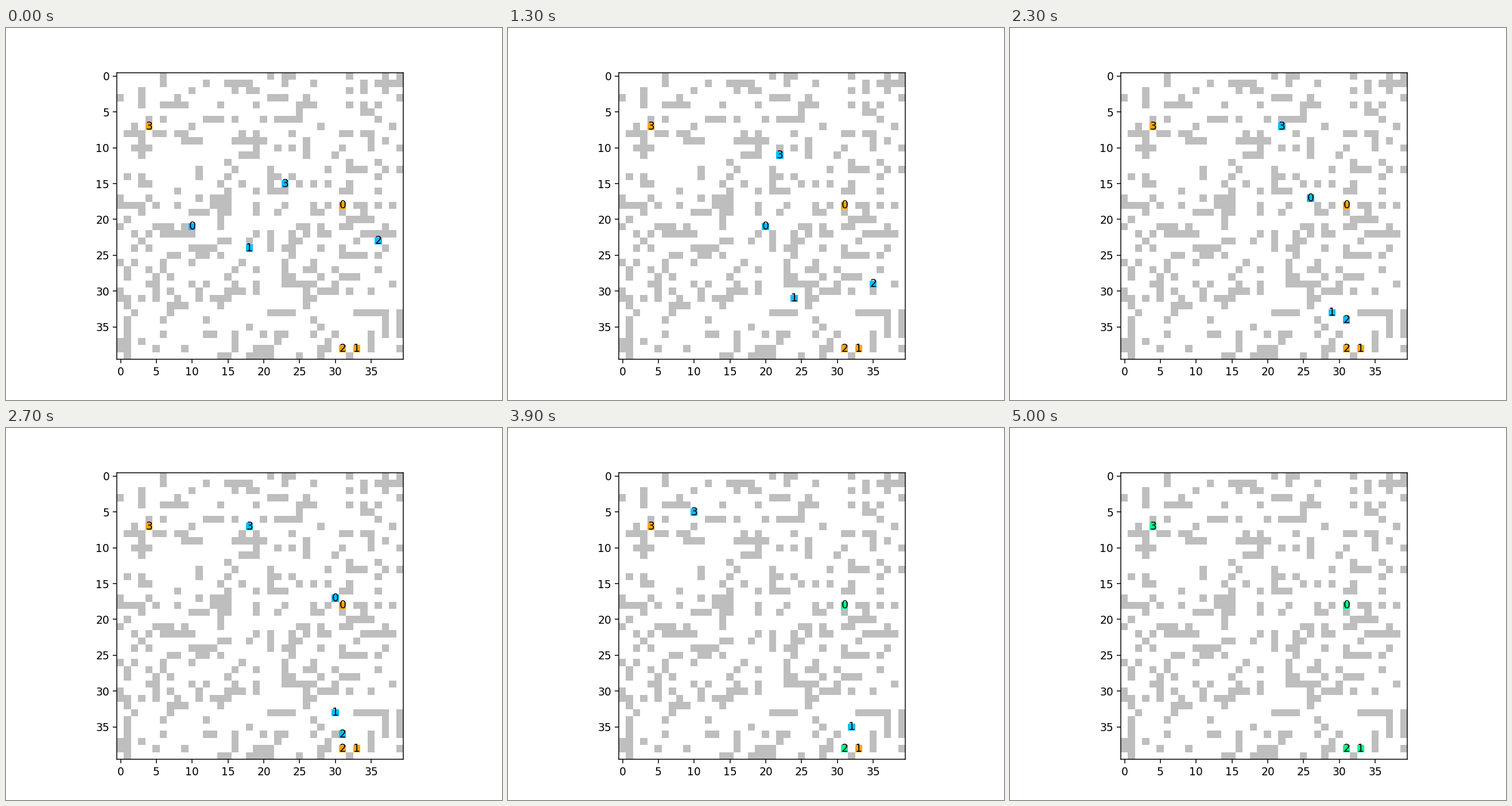
Recreate the animation shown at these times as a matplotlib script. Size 864 by 648 pixels, loop 8000 ms.

```python
import matplotlib.pyplot as plt
import numpy as np
from matplotlib.animation import FuncAnimation

SIZE = 40
STEP_MS = 100
FRAMES = 80

WHITE = (255, 255, 255)
WALL = (190, 190, 190)
GOAL = (255, 165, 0)
AGENT = (0, 191, 255)
ARRIVED = (0, 255, 144)

MOVES = {"U": (-1, 0), "D": (1, 0), "L": (0, -1), "R": (0, 1), ".": (0, 0)}

# Start cell (row, column) and one move per step; a dot waits.
AGENTS = [
    ((21, 10), ".RRDR" "RRUR" "RRRR" "URRRRU" "RUURRRRR" "RD"),
    ((24, 18), "DDRRR" "DDDD" "DRRR" "RDDRRR" "...R...R"
               "..R..D..D" "..R" "DDDR" "....." "RL"),
    ((23, 36), "RRRDD" "DLLD" "DDLL" "LLDDDL" "DL.D.D.D" "DD"),
    ((15, 23), "UULUU" + "." * 12 + "RU" "UUULLLLL"
               "UULLLLLLU" "LLD" "LLLLLL" "LDDR"),
]

# The longest walls: (row, column, length) across, then downwards.
ACROSS = [
    (1, 16, 3), (1, 36, 3), (3, 21, 3), (4, 6, 4), (6, 12, 3), (8, 1, 3),
    (9, 16, 4), (11, 17, 3), (18, 0, 3), (19, 10, 3), (20, 32, 3),
    (21, 5, 3), (22, 8, 3), (22, 36, 3), (24, 11, 3), (25, 31, 3),
    (28, 31, 3), (29, 23, 5), (30, 15, 3), (30, 28, 3), (31, 13, 3),
    (32, 7, 3), (33, 21, 4), (33, 33, 5), (38, 19, 3), (39, 18, 4),
]
DOWN = [
    (2, 3, 3), (8, 3, 4), (9, 19, 3), (9, 26, 3), (13, 21, 4), (16, 15, 4),
    (19, 14, 3), (22, 21, 3), (22, 24, 4), (26, 23, 4), (28, 5, 4),
    (29, 26, 4), (34, 1, 6), (34, 37, 3), (34, 39, 3), (36, 16, 3),
    (36, 35, 3),
]


def walk(start, moves):
    cells = [start]
    for move in moves:
        (row, col), (dr, dc) = cells[-1], MOVES[move]
        cells.append((row + dr, col + dc))
    return cells


def build_map(paths):
    """Scattered blocks plus the long walls, with every route kept free."""
    rng = np.random.default_rng(7)
    walls = rng.random((SIZE, SIZE)) < 0.18
    for path in paths:
        for cell in path:
            walls[cell] = False
    for row, col, length in ACROSS:
        walls[row, col:col + length] = True
    for row, col, length in DOWN:
        walls[row:row + length, col] = True
    grid = np.full((SIZE, SIZE, 3), WHITE, dtype=np.uint8)
    grid[walls] = WALL
    return grid


paths = [walk(start, moves) for start, moves in AGENTS]
goals = [path[-1] for path in paths]
base = build_map(paths)
for goal in goals:
    base[goal] = GOAL

fig, ax = plt.subplots(figsize=(6.4, 4.8), dpi=135)
image = ax.imshow(base, interpolation="nearest")
ax.set_xticks(range(0, SIZE, 5))
ax.set_yticks(range(0, SIZE, 5))


def add_label(cell, number):
    row, col = cell
    return ax.text(col, row, str(number), ha="center", va="center")


for number, goal in enumerate(goals):
    add_label(goal, number)
labels = [add_label(path[0], number) for number, path in enumerate(paths)]


def update(frame):
    grid = base.copy()
    for path, goal, label in zip(paths, goals, labels):
        cell = path[min(frame, len(path) - 1)]
        grid[cell] = ARRIVED if cell == goal else AGENT
        label.set_position(cell[::-1])
        label.set_visible(cell != goal)
    image.set_data(grid)
    return [image, *labels]


anim = FuncAnimation(fig, update, frames=FRAMES, interval=STEP_MS,
                     repeat=True, repeat_delay=0, blit=False)
plt.show()
```
